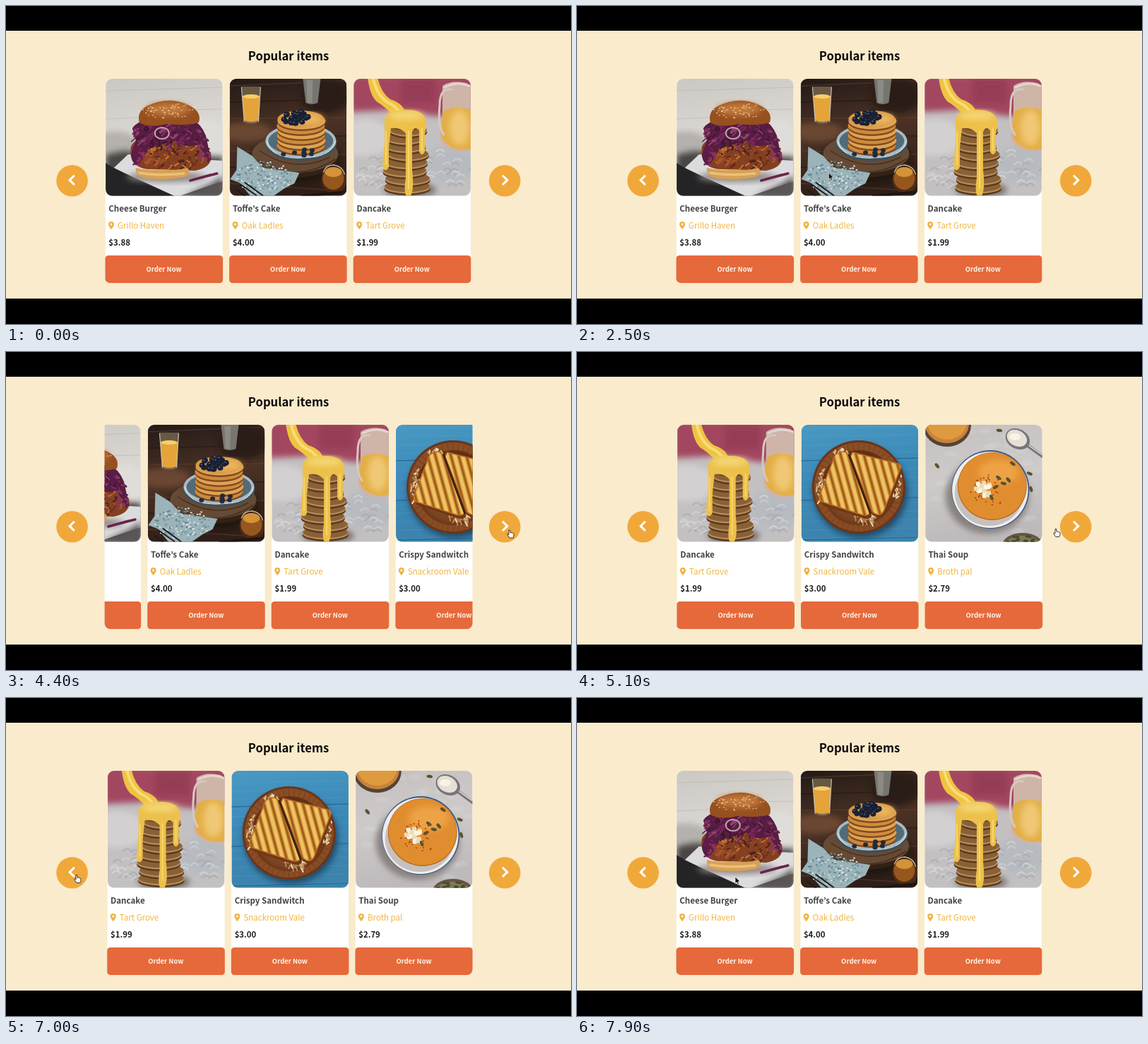
An HTML page that plays this animation: 800 px wide and 450 px high, repeating every 8 s.

```html
<!DOCTYPE html>
<html lang="en">
<head>
<meta charset="utf-8">
<title>Popular items</title>
<style>
  html, body { margin: 0; width: 100%; height: 100%; overflow: hidden; background: #000; }
  svg { display: block; width: 100vw; height: 100vh; }
  text { font-family: "Noto Sans CJK KR", "Noto Sans CJK JP", "Noto Sans CJK SC", "Noto Sans", sans-serif; }
  .title { font-size: 16.7px; font-weight: 700; text-anchor: middle; fill: #0c0808; }
  .name, .price { font-size: 11.55px; font-weight: 700; fill: #434343; }
  .price { font-size: 11.4px; fill: #1d1d1d; }
  .place { font-size: 11.5px; fill: #f1b440; }
  .order { font-size: 9.45px; font-weight: 700; text-anchor: middle; fill: #fff3e6; }
</style>
</head>
<body>
<svg id="stage" viewBox="0 0 800 450"></svg>
<script>
const LOOP = 8000, STEP = 100;
const CARD_X = 140.8, PITCH = 175.6, SCROLL = 350.3;
const SLIDE_MS = 410, SLIDE_OUT = 4240, SLIDE_BACK = 6981;

// Drawing helpers
const ell = (x, y, rx, ry, fill, more = '') =>
  `<ellipse cx="${x}" cy="${y}" rx="${rx}" ry="${ry}" fill="${fill}" ${more}/>`;
const box = (x, y, w, h, fill, more = '') =>
  `<rect x="${x}" y="${y}" width="${w}" height="${h}" fill="${fill}" ${more}/>`;
const shape = (d, fill, more = '') => `<path d="${d}" fill="${fill}" ${more}/>`;
const stroke = (d, color, width, more = '') =>
  `<path d="${d}" fill="none" stroke="${color}" stroke-width="${width}" stroke-linecap="round" stroke-linejoin="round" ${more}/>`;
const label = (cls, x, y, words) => `<text class="${cls}" x="${x}" y="${y}">${words}</text>`;
const repeat = (n, draw) => Array.from({ length: n }, (_, i) => draw(i)).join('');
const soft = 'filter="url(#soft)"';
const faint = 'opacity=".5"';

function random(seed) {
  return () => (seed = (seed * 16807) % 2147483647) / 2147483647;
}

// n small marks spread evenly over an ellipse
function scatter(n, seed, cx, cy, rx, ry, draw) {
  const rnd = random(seed);
  rnd();
  return repeat(n, () => {
    const a = rnd() * 2 * Math.PI, r = Math.sqrt(rnd());
    return draw(cx + rx * r * Math.cos(a), cy + ry * r * Math.sin(a), rnd);
  });
}
const pick = (list, rnd) => list[Math.floor(rnd() * list.length)];

function burger() {
  const shred = colors => (x, y, rnd) => {
    const dx = rnd() * 14 - 7, dy = rnd() * 12 - 3;
    return stroke(`M${x} ${y}q${dy} ${dx / 2} ${dx} ${dy}`, pick(colors, rnd), 1.2 + rnd() * 1.8);
  };
  return box(0, 0, 166, 166, 'url(#wall)')
    + stroke('M0 17L166 12M0 57L60 54M110 44L166 43', '#b3afa9', 1.2, faint)
    + ell(14, 92, 32, 18, '#b5b1ad', soft) + ell(144, 85, 34, 28, '#dfddd9', soft)
    + shape('M0 107L25 102L166 111V166H0Z', '#4a4745', soft)
    + shape('M12 126L32 107L166 116V145L104 166H92Z', '#dcdcde')
    + shape('M0 119L13 127L98 166H0Z', '#242325')
    + shape('M166 137L150 148L112 166H166Z', '#5b5657', soft)
    + ell(86, 139, 56, 7, '#8e8583', soft)
    + shape('M36 96Q44 79 77 83Q126 77 149 104Q154 125 127 130L66 128Q32 128 36 96Z', '#83401f')
    + scatter(110, 9, 92, 107, 52, 18, shred(['#a8572b', '#c37536', '#6e2c20', '#8e4226', '#492120']))
    + shape('M43 126Q60 131 80 128Q100 131 116 126Q123 134 112 139Q88 144 58 141Q42 138 43 126Z', '#d6a156')
    + stroke('M48 133Q75 138 111 134', '#ebc177', 3.5)
    + shape('M38 70Q45 60 60 58L122 57Q135 63 142 80L150 116Q138 106 132 93Q113 100 99 87Q75 94 61 98L47 122Q38 122 36 108L43 87Z', '#561e42')
    + scatter(110, 71, 86, 78, 49, 17, shred(['#5a1b46', '#792759', '#401631', '#90436f', '#6b244c']))
    + scatter(16, 25, 45, 107, 8, 15, shred(['#651b48', '#8c315e']))
    + scatter(14, 18, 140, 100, 8, 18, shred(['#5e1d47', '#873463']))
    + shape('M48 62Q44 45 60 38Q92 23 121 39Q137 48 132 62Q115 67 87 64Q62 70 48 62Z', '#97501f')
    + ell(89, 43, 31, 9, '#c47a3c', soft)
    + scatter(55, 37, 89, 45, 37, 11, (x, y, rnd) => ell(x, y, 1.2, .7, pick(['#f1d7a7', '#e3b97e'], rnd)))
    + '<ellipse cx="80" cy="77" rx="10" ry="8" fill="none" stroke="#c6a1b1" stroke-width="2"/>'
    + stroke('M120 144L149 136M127 142L158 134', '#692448', 3.5);
}

function toffee() {
  return box(0, 0, 166, 166, 'url(#wood)')
    + repeat(7, i => stroke(`M0 ${10 + i * 23}L166 ${3 + i * 26}`, i % 2 ? '#1a100b' : '#684532', 1.3, faint))
    + ell(24, 75, 36, 14, '#6b4732', soft) + ell(135, 25, 36, 24, '#2b1d18', soft)
    + shape('M104 0H129L125 34Q116 38 108 34Z', '#77756f')
    + shape('M109 2H118L117 34H110Z', '#a19f9a', faint)
    + shape('M17 11H44L42 61Q31 66 20 61Z', '#a4926f', faint)
    + shape('M18 25H43L41 59Q31 63 21 59Z', '#e5a43a')
    + ell(30.5, 25, 12, 3, '#f7cf6c') + stroke('M17 12L21 60M44 12L41 60', '#c8c0af', 1.2)
    + ell(93, 116, 63, 31, '#1d120d', soft)
    + ell(93, 112, 61, 28, '#332116') + ell(93, 106, 61, 27, '#654a35')
    + stroke('M35 113Q92 151 149 114M43 102Q92 135 142 111', '#453020', 1.5)
    + shape('M11 96L32 109L48 126L99 133L92 148L78 155L62 166H30L14 147L1 142L10 129Z', '#9bb3b9')
    + scatter(150, 61, 48, 139, 39, 24, (x, y, rnd) =>
        y > 109 + Math.max(0, (x - 30) * .3)
          ? box(x, y, 2.5, 2, pick(['#d8e2df', '#5d8291', '#7c9ca7'], rnd)) : '')
    + ell(101, 91, 51, 25, '#3b505d') + ell(101, 88, 50, 24, '#a8bbc3') + ell(101, 88, 46, 20, '#536a77')
    + stroke('M53 88Q58 113 101 112Q145 112 150 88', '#dce4e2', 1.2)
    + repeat(6, i => ell(101 + (i % 2), 97 - i * 7, 34, 12, '#86481f')
        + ell(101 + (i % 2), 94.5 - i * 7, 34, 12, i % 2 ? '#dca553' : '#cc8c3d'))
    + ell(101, 57, 33, 12, '#d89848') + ell(114, 57, 18, 7, '#edb85f', soft)
    + scatter(30, 41, 94, 55, 18, 9, (x, y) => ell(x, y, 4, 3.8, '#192033') + ell(x - 1, y - 1, 1.4, .9, '#53617a'))
    + scatter(8, 65, 105, 105, 40, 5, (x, y) => ell(x, y, 3.5, 3, '#202b3d'))
    + ell(148, 143, 18, 19, '#4c2b15') + ell(147, 141, 15, 16, '#96571f')
    + ell(147, 132, 12, 7, '#d39336') + stroke('M133 132Q136 122 148 122Q160 124 163 135', '#c5b49a', 1.3)
    + stroke('M15 149L38 165M22 147L47 165M10 157L22 166', '#20191a', 2)
    + stroke('M103 166L166 160', '#1e1511', 4);
}

function dancake() {
  const layers = 9;
  return box(0, 0, 166, 166, '#c3c0c1')
    + shape('M-6 -6H172V47L118 53L58 44L-6 47Z', '#a34760', soft)
    + box(67, 0, 50, 35, '#963d57', soft)
    + ell(15, 83, 40, 26, '#d3d0d1', soft) + ell(137, 121, 36, 28, '#b7bbc0', soft)
    + scatter(65, 23, 83, 132, 82, 33, (x, y, rnd) =>
        stroke(`M${x} ${y}q6 -6 11 0`, pick(['#e4e4e5', '#9fa4ab', '#d7d9dc'], rnd), 2.2, faint))
    + shape('M126 10Q139 1 160 6L166 10V102Q149 106 130 97Q116 85 126 52Z', '#cfb4a8')
    + shape('M128 45Q146 37 166 44V99Q145 104 131 91Q119 82 128 45Z', '#e2ae46')
    + ell(150, 69, 14, 25, '#f0c874', soft)
    + stroke('M139 15Q122 12 122 38Q119 67 128 79', '#d6c7c2', 3)
    + stroke('M129 12Q147 3 164 10', '#e4d6ce', 3)
    + ell(80, 157, 37, 11, '#77706d', soft)
    + repeat(layers, i => {
        const k = layers - 1 - i, x = 75 + 2.5 * Math.sin(k * 1.9), y = 60 + k * 11.5, r = 26 + k * .85;
        return ell(x, y + 4, r, 9, '#573a20') + ell(x, y + 1.5, r, 9, '#b78c57') + ell(x, y, r - 1, 8, '#8a6036');
      })
    + shape('M20 -2H34Q39 20 52 29Q73 36 73 50L57 54Q50 44 37 35Q24 29 20 -2Z', '#efc342')
    + stroke('M28 0Q33 23 48 33Q61 39 65 48', '#f8dc76', 4)
    + shape('M44 57Q46 44 73 44Q101 43 103 61Q104 70 101 74V103Q97 111 93 103V73Q87 66 83 75V128Q87 164 78 168Q70 166 74 140V77Q66 68 53 70L50 98V125Q45 134 41 124L44 90Z', '#ecc04a')
    + ell(74, 52, 25, 6, '#f5d878', soft)
    + stroke('M78 74V155M46 75V121M97 70V101', '#f8d569', 2);
}

function sandwich() {
  const bread = (id, d) =>
    `<clipPath id="${id}"><path d="${d}"/></clipPath>`
    + shape(d, '#713716', 'transform="translate(2 5)"') + shape(d, '#cd872c')
    + `<g clip-path="url(#${id})">`
    + repeat(14, i => stroke(`M${3 + i * 11} 30l30 110`, '#edc365', 5)
        + stroke(`M${8.5 + i * 11} 30l30 110`, '#9a5a1e', 2.4)) + '</g>'
    + stroke(d, '#b86d25', 1.5);
  const crumbs = (n, seed, x, y, rx, ry) => scatter(n, seed, x, y, rx, ry, (a, b, rnd) =>
    stroke(`M${a} ${b}l${rnd() * 8 - 4} ${rnd() * 7}`, pick(['#eee0b8', '#d9bd87', '#b88654'], rnd), 2));
  return box(0, 0, 166, 166, 'url(#blue)')
    + repeat(3, i => stroke(`M0 ${51 + i * 56}L166 ${47 + i * 56}`, '#276e9c', 1.6))
    + repeat(14, i => stroke(`M0 ${i * 12 + 5}L166 ${i * 12 + 2}`, '#71acc9', .7, 'opacity=".3"'))
    + ell(84, 95, 67, 65, '#204c69', soft)
    + ell(81.5, 88, 66, 66, '#6b3519') + ell(81.5, 88, 63, 63, '#8a4d25')
    + repeat(48, i => `<path d="M81.5 26v10" stroke="#5e2e16" opacity=".45" transform="rotate(${i * 7.5} 81.5 88)"/>`)
    + ell(82, 89, 53, 53, '#623015') + ell(82, 95, 48, 45, '#7d4623', soft)
    + crumbs(34, 33, 31, 87, 9, 25) + crumbs(30, 47, 94, 130, 18, 7) + crumbs(24, 81, 135, 84, 7, 25)
    + crumbs(14, 17, 57, 38, 11, 5)
    + bread('left-half', 'M48 43Q58 34 66 41L69 50L98 124Q94 131 82 126L30 109Q23 107 27 98Z')
    + bread('right-half', 'M73 39L137 55Q144 57 139 66L117 122Q111 132 101 123L70 45Z')
    + stroke('M68 43L98 125', '#3e2110', 3);
}

function soup() {
  const seed = (x, y, turn) => ell(x, y, 4.3, 2.2, '#5b5230', `transform="rotate(${turn} ${x} ${y})"`);
  return box(0, 0, 166, 166, 'url(#stone)')
    + scatter(25, 13, 83, 83, 83, 83, (x, y) => ell(x, y, 9, 4, '#d9d6d5', 'opacity=".25"'))
    + ell(31, 1, 34, 30, '#564236') + ell(31, -1, 31, 27, '#c9823a') + ell(31, -4, 28, 25, '#df9a3f')
    + stroke('M142 27L171 48', '#77757a', 5) + stroke('M142 26L171 46', '#e0dfe1', 1.5)
    + ell(131, 20, 18, 14, '#77757a', 'transform="rotate(28 131 20)"')
    + ell(130, 19, 15, 11, '#e6dfd4', 'transform="rotate(28 130 19)"') + ell(127, 17, 8, 5, '#f8f2e7')
    + ell(88, 101, 59, 53, '#87817f', soft)
    + ell(92.5, 91.5, 55, 55.5, '#355682') + ell(92, 92, 53.8, 54, '#efedeb')
    + ell(91, 96, 49, 47, '#c6c1bf') + ell(95, 87, 49, 48, '#b96821')
    + ell(95, 86.5, 48, 47, '#e08d2f') + ell(104, 67, 29, 17, '#eda344', soft)
    + scatter(35, 51, 88, 94, 26, 27, (x, y) => ell(x, y, 1.2, .9, '#a93e19'))
    + scatter(24, 43, 82, 92, 13, 10, (x, y, rnd) => box(x - 3, y - 3, 6, 5.5, pick(['#fff5dd', '#eadcbb'], rnd), 'rx="1"'))
    + seed(104, 75, 35) + seed(100, 88, -30) + seed(111, 83, 15) + seed(94, 103, 65) + seed(118, 78, 50)
    + seed(105, 8, 10) + seed(124, 55, 35) + seed(150, 91, 72) + seed(148, 69, 25) + seed(17, 58, 50)
    + ell(138, 171, 29, 18, '#655444') + ell(138, 171, 25, 14, '#7d7b54')
    + scatter(25, 29, 137, 165, 20, 8, (x, y) => ell(x, y, 3, 1.5, '#484b31'));
}

const menu = [
  ['Cheese Burger', 'Grillo Haven', '$3.88', burger],
  ['Toffe’s Cake', 'Oak Ladles', '$4.00', toffee],
  ['Dancake', 'Tart Grove', '$1.99', dancake],
  ['Crispy Sandwitch', 'Snackroom Vale', '$3.00', sandwich],
  ['Thai Soup', 'Broth pal', '$2.79', soup],
];

const card = ([name, place, price, photo], i) =>
  `<g transform="translate(${CARD_X + i * PITCH} 103)">`
  + box(0, 0, 166, 288, '#fff', 'rx="9"')
  + `<g clip-path="url(#photo)">${photo()}</g>`
  + label('name', 4.5, 188.3, name)
  + shape('M8.2 213.2Q4.2 208.5 4.2 206A4 4 0 0 1 12.2 206Q12.2 208.5 8.2 213.2Z', '#f1b440')
  + ell(8.2, 206, 1.4, 1.4, '#fff')
  + label('place', 17.3, 211.8, place) + label('price', 4.5, 235.6, price)
  + box(-.3, 250, 166.6, 39, '#e5693b', 'rx="4.5"') + label('order', 82.8, 272.8, 'Order Now') + '</g>';

const roundButton = (x, dir) => ell(x, 247.3, 22.3, 22.3, '#f1a83b')
  + stroke(`M${x - 3.2 * dir} 239.8L${x + 3.5 * dir} 246.4L${x - 3.2 * dir} 253`, '#fff', 3, 'style="stroke-linecap:butt;stroke-linejoin:miter"');

const gradient = (id, ...colors) => `<linearGradient id="${id}" x2=".2" y2="1">`
  + colors.map((c, i) => `<stop offset="${i / (colors.length - 1)}" stop-color="${c}"/>`).join('') + '</linearGradient>';

document.getElementById('stage').innerHTML = '<defs>'
  + gradient('wall', '#cbc8c3', '#dad7d2', '#c3bfbb')
  + gradient('wood', '#231a17', '#4b3225', '#2f1f18')
  + gradient('blue', '#4999c3', '#3b89b8', '#3c83ad')
  + gradient('stone', '#c3c0bf', '#cdcac9', '#bebabb')
  + '<filter id="soft" x="-30%" y="-30%" width="160%" height="160%"><feGaussianBlur stdDeviation="4"/></filter>'
  + `<clipPath id="photo">${box(.4, 0, 165.4, 165.6, '#000', 'rx="9"')}</clipPath>`
  + `<clipPath id="window">${box(139.6, 97, 521, 295, '#000', 'rx="8"')}</clipPath></defs>`
  + box(0, 0, 800, 450, '#000') + box(0, 35, 800, 379, '#f9ebcc')
  + label('title', 400, 76.7, 'Popular items')
  + `<g clip-path="url(#window)"><g id="strip">${menu.map(card).join('')}</g></g>`
  + roundButton(93.6, -1) + roundButton(706.2, 1)
  + '<g id="cursor"><path id="arrow" d="M0 0V9.6L2.2 7.6L3.7 11L5.5 10.2L4 6.9H7Z" fill="#080808" stroke="#fff" stroke-width=".7"/>'
  + '<path id="hand" d="M-1 .8Q0 -.6 1 .8V4.2Q2 3.4 2.8 4.5Q3.8 3.8 4.5 5Q6 4.4 6 6.2V8.6L4.8 11.5H-.2L-3 7.3Q-3.6 5.6 -2.2 6L-1 7Z" fill="#fff" stroke="#222" stroke-width=".9"/></g>';

// Pointer path: time, x, y; equal neighbours are rests
const pointer = [
  [400, 470, 404], [1200, 425, 372], [1400, 412, 345], [1500, 412, 345], [1600, 416.5, 330],
  [2000, 130, 219], [2400, 319, 229], [2700, 431, 250], [2800, 431, 250],
  [3600, 713, 251.5], [5000, 713, 251.5], [5100, 678, 250], [5500, 645, 250], [5700, 645, 250],
  [5900, 405, 122], [6100, 164, 211.5], [6500, 100, 250], [7700, 100, 250], [7900, 224, 253],
];

function pointerAt(t) {
  const i = pointer.findIndex(p => p[0] > t);
  if (i === 0) return null;
  if (i < 0) return pointer[pointer.length - 1].slice(1);
  const [t0, x0, y0] = pointer[i - 1], [t1, x1, y1] = pointer[i];
  const p = (t - t0) / (t1 - t0);
  return [x0 + (x1 - x0) * p, y0 + (y1 - y0) * p];
}

function slide(t, start) {
  const p = Math.min(1, Math.max(0, (t - start) / SLIDE_MS));
  return (1 - Math.cos(Math.PI * p)) / 2;
}

const [strip, cursor, arrow, hand] = ['strip', 'cursor', 'arrow', 'hand'].map(id => document.getElementById(id));

function render(t) {
  const shift = SCROLL * (slide(t, SLIDE_BACK) - slide(t, SLIDE_OUT));
  strip.setAttribute('transform', `translate(${shift} 0)`);
  const spot = pointerAt(t);
  cursor.style.display = spot ? '' : 'none';
  if (!spot) return;
  const [x, y] = spot;
  const onRound = [93.6, 706.2].some(cx => Math.hypot(x - cx, y - 247.3) < 29);
  const onOrder = y > 353 && y < 392 && x > 140 && x < 660;
  const linked = onRound || onOrder;
  hand.style.display = linked ? '' : 'none';
  arrow.style.display = linked ? 'none' : '';
  cursor.setAttribute('transform', `translate(${x} ${y})`);
}

const begin = performance.now();
function tick() {
  const t = (performance.now() - begin) % LOOP;
  render(Math.floor(t / STEP) * STEP);
  requestAnimationFrame(tick);
}
tick();
</script>
</body>
</html>
```
